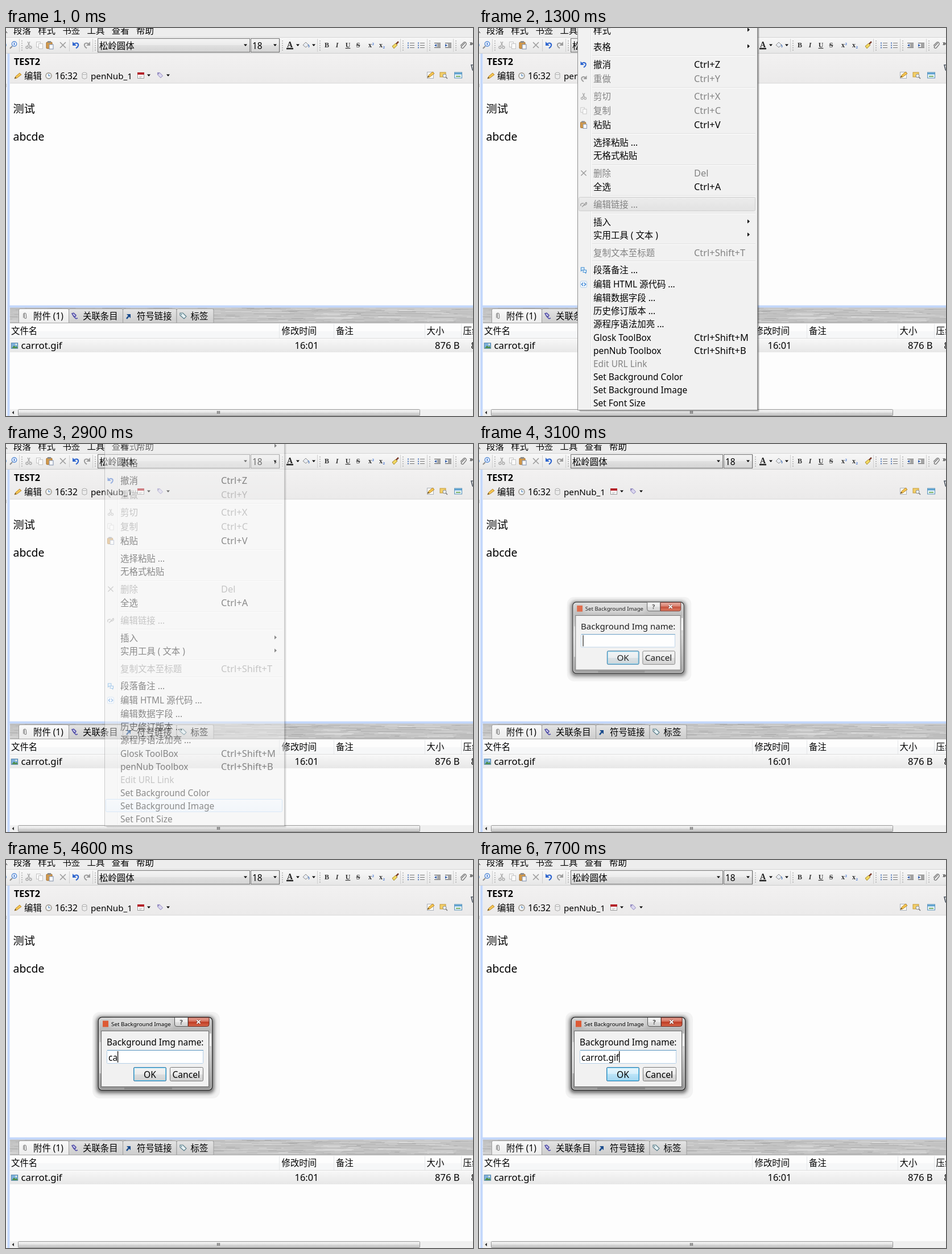
An HTML page for the animation above (8 s loop, 821 px wide and 682 px high).

```html
<!DOCTYPE html>
<html lang="zh-CN">
<head>
<meta charset="utf-8">
<title>Set Background Image</title>
<style>
html, body { margin: 0; width: 100%; height: 100%; overflow: hidden; background: #fdfdfd; }
svg { display: block; width: 821px; height: 682px; }
text { font-family: "Noto Sans", "Noto Sans CJK SC", sans-serif; white-space: pre; }
.serif { font-family: "Liberation Serif", serif; }
</style>
</head>
<body>
<svg id="stage" viewBox="0 0 821 682" xmlns="http://www.w3.org/2000/svg"></svg>
<script>
const LOOP = 8000;
const stage = document.getElementById('stage');

// drawing helpers
const attrs = (o = {}) => Object.entries(o).map(([k, v]) => ` ${k}="${v}"`).join('');
const text = (x, y, s, size = 15.4, fill = '#000', o) =>
  `<text x="${x}" y="${y}" font-size="${size}" fill="${fill}"${attrs(o)}>${s}</text>`;
const rect = (x, y, w, h, fill, o) =>
  `<rect x="${x}" y="${y}" width="${w}" height="${h}" fill="${fill}"${attrs(o)}/>`;
const path = (d, stroke, w = 1, fill = 'none', o) =>
  `<path d="${d}" stroke="${stroke}" stroke-width="${w}" fill="${fill}"${attrs(o)}/>`;
const circle = (x, y, r, fill, o) => `<circle cx="${x}" cy="${y}" r="${r}" fill="${fill}"${attrs(o)}/>`;
const at = (x, y, s) => `<g transform="translate(${x} ${y})">${s}</g>`;
const grad = (id, ...stops) => `<linearGradient id="${id}" x2="0" y2="1">` +
  stops.map(([p, c]) => `<stop offset="${p}" stop-color="${c}"/>`).join('') + '</linearGradient>';
const down = (x, y) => path(`M${x - 3} ${y - 1.5}h6l-3 3.5z`, 'none', 0, '#000');
const right = (x, y) => path(`M${x - 2} ${y - 3.5}v7l4 -3.5z`, 'none', 0, '#000');

const defs = '<defs>' +
  grad('bar', [0, '#f8f8f8'], [0.45, '#f1f1f1'], [1, '#e6e6e6']) +
  grad('head', [0, '#f2f1f1'], [1, '#ebeaea']) +
  grad('combo', [0, '#f4f4f4'], [0.5, '#ebebeb'], [0.5, '#e0e0e0'], [1, '#d3d3d3']) +
  grad('tab', [0, '#e4e4e4'], [1, '#cdcdcd']) +
  grad('tabOn', [0, '#fafafa'], [1, '#ececec']) +
  grad('row', [0, '#f7f7f7'], [1, '#e7e7e7']) +
  grad('thumb', [0, '#f4f4f4'], [0.5, '#e6e6e6'], [0.5, '#d6d6d6'], [1, '#c4c4c4']) +
  grad('btn', [0, '#f3f3f3'], [0.5, '#ebebeb'], [0.5, '#dedede'], [1, '#d0d0d0']) +
  grad('btnHot', [0, '#e8f6fd'], [0.5, '#d5eefb'], [0.5, '#bce4f8'], [1, '#a4d6f0']) +
  grad('frame', [0, '#d5d5d5'], [0.18, '#b5b5b5'], [0.45, '#d0d0d0'], [1, '#929292']) +
  grad('red', [0, '#e8a698'], [0.45, '#d5705d'], [0.5, '#be3a22'], [1, '#d9694d']) +
  grad('hot', [0, '#f1f6fb'], [1, '#e5eef8']) +
  grad('dead', [0, '#ececec'], [1, '#e2e2e2']) +
  '<filter id="soft" x="-20%" y="-20%" width="140%" height="140%"><feGaussianBlur stdDeviation="3"/></filter>' +
  '</defs>';

// icons, centred on 0,0
const GREY = '#a9a9a9';
const icon = {
  cut: path('M-2 -6L2 2M2 -6L-2 2', GREY, 1.4) +
    circle(-3, 4, 2, 'none', { stroke: GREY, 'stroke-width': 1.4 }) + circle(3, 4, 2, 'none', { stroke: GREY, 'stroke-width': 1.4 }),
  copy: rect(-5.5, -5.5, 7, 9, '#fafafa', { stroke: '#c4c4c4' }) + rect(-1.5, -2.5, 7, 9, '#fafafa', { stroke: '#c4c4c4' }),
  paste: rect(-6, -5, 10, 11, '#d39a4b', { rx: 1, stroke: '#a06a28' }) + rect(-4, -7, 6, 3, '#8c8c8c') +
    rect(-1, -1, 7, 8, '#f6f8fb', { stroke: '#7d8ca8' }),
  del: path('M-5 -5L5 5M5 -5L-5 5', '#9a9a9a', 1.5),
  undo: path('M-4 -1C-1 -5 5 -4 4 1C3.5 3 2 4.5 0 5.5', '#2f66cf', 2.2) + path('M-6 -6v7h7z', 'none', 0, '#2f66cf'),
  redo: path('M4 -1C1 -5 -5 -4 -4 1C-3.5 3 -2 4.5 0 5.5', '#9b9b9b', 2) + path('M6 -6v7h-7z', 'none', 0, '#9b9b9b'),
  link: path('M-5 3a3 3 0 0 1 2 -5l3 0M5 -4a3 3 0 0 1 -2 5l-3 1M-3 5L5 -4', '#9f9f9f', 1.6),
  note: path('M-5 -5h6v5h-4l-2 2z', '#3d8ad0', 1.1, '#d8ecfb') + path('M-1 0h6v4h-1v2l-2 -2h-3z', '#3d8ad0', 1.1, '#eef7fd'),
  code: rect(-6, -6, 12, 12, '#f3f8fd', { rx: 2, stroke: '#a9c9e8' }) + path('M-1 -3l-3 3l3 3M1 -3l3 3l-3 3', '#2c7ad0', 1.4),
  pencil: path('M-6 5L-4 1L3 -5L6 -2L-2 4z', '#b9862d', 1, '#f4c552') + path('M-6 5l1.5 -3l1.5 1.5z', 'none', 0, '#4a4030'),
  clock: circle(0, 0, 5, '#f4f8fb', { stroke: '#a8a39a', 'stroke-width': 1.8 }) + path('M0 -3V0H3', '#4a7fb5', 1.2),
  disk: path('M-4 -4v8q4 3 8 0v-8', '#a8a8a8', 1, '#ededed') +
    '<ellipse cy="-4" rx="4" ry="1.8" fill="#f8f8f8" stroke="#a8a8a8"/>',
  cal: rect(-5.5, -4.5, 11, 10, '#fff', { stroke: '#9a9a9a' }) + rect(-6, -5, 12, 4, '#b4232a') + path('M-3 2h6M-3 4h4', '#bbb'),
  tag: path('M-5 -5h4l6 6l-4 4l-6 -6z', '#7d74b5', 1, '#dcd8f0') + circle(-3, -3, 1, '#5a5190'),
  clip: path('M3 -4L-3 2a2 2 0 0 0 3 3L5 -1a3 3 0 0 0 -4 -4L-5 1', '#777', 1.3),
  chain: path('M-5 -4l3 -1l4 4l-1 2l-3 0zM5 4l-3 1l-4 -4', '#4a47a3', 1.5, '#cfcdee'),
  pic: rect(-6, -4.5, 12, 10, '#7fb2dd', { stroke: '#4c7fa8' }) + path('M-5 5L-1 0L2 3L4 1L6 5z', 'none', 0, '#4d8e46') + circle(3, -2, 1.5, '#f6f6d8')
};
const put = (name, x, y, k = 1) => `<g transform="translate(${x} ${y}) scale(${k})">${icon[name]}</g>`;

// top bars
const grip = x => path(`M${x} 22V40`, '#9c9c9c', 1.5, 'none', { 'stroke-dasharray': '1.5 2.5' }) +
  path(`M${x - 4.5} 19V42`, '#d0d0d0');
const lines = (x, c) => [-4, 0, 4].map(d => path(`M${x - 2} ${30.5 + d}h8`, '#777') + rect(x - 6, 29.5 + d, 2, 2, c)).join('');
const indent = (x, dir) => path(`M${x - 5} 26.5h11M${x} 28.5h6M${x} 30.5h6M${x} 32.5h6M${x - 5} 34.5h11`, '#555') +
  path(`M${x - 3 + dir * 2} 30.5l${-dir * 4} -2.5v5z`, 'none', 0, '#3762ad');
const glyph = (x, s, o) => text(x, 34, s, 12, '#333', { class: 'serif', 'text-anchor': 'middle', 'font-weight': 700, ...o });

function topBars() {
  let s = rect(0, 0, 821, 17, '#ededed') + rect(0, 16, 821, 28, 'url(#bar)') + path('M0 16.5H821', '#d5d5d5') + path('M0 44.5H821', '#cfcfcf');
  ['段落', '样式', '书签', '工具', '查看', '帮助'].forEach((w, i) => s += text(13 + i * 43.2, 10, w));
  s += path('M0 6l2 3', '#333') + circle(-2, 30, 3, '#6b9bd8') + at(13, 30,
    path('M-2 2L-6 6', '#8b8b8b', 2) + circle(1.5, -2, 4.2, '#eef5fd', { stroke: '#5c8fd6', 'stroke-width': 1.4 }) + path('M1.5 -4v4', '#2f66cf', 1.5));
  s += [28, 157, 486, 552, 698, 745, 791].map(grip).join('') + path('M111.5 20V41', '#cfcfcf');
  s += put('cut', 40, 30) + put('copy', 59, 30) + put('paste', 77, 30) + put('del', 100, 30) + put('undo', 123, 30) + put('redo', 142, 30);
  s += rect(161.5, 18.5, 267, 24, 'url(#combo)', { stroke: '#707070' }) + text(164, 36.5, '松岭圆体') + down(421, 30);
  s += rect(430.5, 18.5, 50, 24, 'url(#combo)', { stroke: '#707070' }) + text(433, 36.5, '18') + down(473, 30);
  s += text(499, 34, 'A', 14, '#222', { class: 'serif', 'text-anchor': 'middle', 'font-weight': 700 }) + rect(493, 35, 12, 2.5, '#222') + down(513, 30);
  s += at(527, 30, path('M-5 0L0 -5L5 0L0 4z', '#8a8a8a', 1, '#e9edf3') + path('M4 -1q3 3 1 5', '#5a82c0', 1.5)) + down(541, 30);
  s += glyph(564, 'B') + glyph(582, 'I', { 'font-style': 'italic' }) + glyph(601, 'U', { 'text-decoration': 'underline' }) +
    glyph(619, 'S', { 'text-decoration': 'line-through' });
  const small = (x, y) => text(x, y, '2', 7, '#2f66cf', { class: 'serif', 'font-weight': 700 });
  s += glyph(640, 'x') + small(643.5, 30) + glyph(659, 'x') + small(662.5, 36);
  s += at(684, 30, path('M-5 2L1 -3L4 0L-2 6z', '#a78a2c', 1, '#f1d763') + path('M2 -2L6 -6', '#7b3c2c', 2.5));
  s += lines(712, '#4f79bd') + lines(730, '#4f79bd') + indent(758, -1) + indent(777, 1) + put('clip', 804, 30) + text(815, 31, '»', 12);
  return s;
}

function titleBar() {
  return rect(7, 45, 814, 52, 'url(#head)') + path('M7 97H821', '#d7d7d7') +
    text(14, 64.5, 'TEST2', 16.2, '#000', { 'font-weight': 700 }) +
    put('pencil', 21, 84) + text(32, 89.5, '编辑') + put('clock', 75, 84) + text(86, 89.5, '16:32', 15.6) +
    put('disk', 138, 84) + text(149, 89.5, 'penNub_1', 15.2) + put('cal', 237, 83) + down(251, 83) + put('tag', 271, 83, 0.9) + down(285, 83) +
    at(746, 83, rect(-5.5, -5.5, 11, 11, '#fbfbf4', { stroke: '#a9b0bb' }) + at(1, -1, icon.pencil)) +
    at(769, 83, rect(-6, -5, 10, 8, '#f3cf69', { stroke: '#c49a36' }) + circle(2, 1, 3, '#eaf3fb', { stroke: '#888' }) + path('M4 3l3 3', '#777', 1.6)) +
    at(795, 83, rect(-6.5, -5, 13, 10, '#e8f3fa', { stroke: '#5b92b8' }) + rect(-6, -4.5, 12, 3, '#5aa0d0') + rect(-4, 1, 8, 2, '#7fb36a')) +
    path('M821 65l-3 0l2 8l1 2', '#48525e', 1.6);
}

// lower panel
function metal() {
  let seed = 7, s = rect(7, 491, 814, 27, '#c3c3c3');
  const rnd = () => (seed = seed * 16807 % 2147483647) / 2147483647;
  for (let i = 0; i < 420; i++) {
    const v = 150 + Math.round(rnd() * 90);
    s += rect((rnd() * 830 - 10).toFixed(1), 492 + Math.floor(rnd() * 25), (15 + rnd() * 60).toFixed(1), 1, `rgb(${v},${v},${v})`, { opacity: 0.5 });
  }
  return s;
}
const tab = (x, w, label, on) =>
  path(`M${x + 0.5} 518V496q0 -2.5 2.5 -2.5h${w - 5}q2.5 0 2.5 2.5V518`, '#9d9d9d', 1, `url(#${on ? 'tabOn' : 'tab'})`) + text(x + (on ? 26 : 25), 512, label);

function panel() {
  let s = metal() + rect(0, 487.5, 821, 4, '#c3d7fb') + path('M7 518.5H821', '#a9a9a9');
  s += tab(110, 95, '关联条目') + tab(205, 94.5, '符号链接') + tab(299.5, 65, '标签') + tab(22, 88, '附件 (1)', true);
  s += `<g transform="translate(33 506) rotate(-45) scale(.8)">${icon.clip}</g>` + put('chain', 121, 506) +
    at(215, 506, path('M-3 5L1 0', '#174a8c', 2.5) + path('M-3 -3h7v7z', 'none', 0, '#174a8c')) +
    at(311, 506, path('M-5 -5h5l6 6l-4 4l-7 -6z', '#4f7480', 1.1, '#e6f2f5') + circle(-2.5, -2.5, 1, '#4f7480'));
  s += rect(7, 519, 814, 26, '#fdfdfd') + rect(7, 533, 814, 12, '#f6f7f8') + path('M7 545.5H821', '#dcdcdc');
  s += [480, 576, 736, 800].map(x => path(`M${x + 0.5} 520V545`, '#e4e6e8')).join('');
  s += text(9, 538, '文件名') + text(484.5, 538, '修改时间') + text(580, 538, '备注') + text(739.5, 538, '大小') + text(803.5, 538, '压缩');
  s += rect(7, 547, 814, 23, 'url(#row)') + put('pic', 15, 558, 0.95) + text(26.5, 564, 'carrot.gif', 16.8) +
    text(507.5, 564, '16:01', 16.4) + text(754, 564, '876 B', 16.6) + text(817.5, 564, '8', 16.6);
  s += rect(7, 670, 814, 12, '#f0f0f0') + path('M14 673v6l-3.5 -3z', 'none', 0, '#333') +
    rect(21.5, 670.5, 706, 11, 'url(#thumb)', { stroke: '#969696', rx: 1 }) + path('M371.5 673v5M373.5 673v5M375.5 673v5', '#555');
  return s + rect(0, 45, 3, 637, '#f3f5f9') + rect(2.5, 45, 4, 637, '#c3d7fb') + path('M0 98v6', '#999');
}

// context menu: centre y, label, shortcut, disabled, icon
const items = [
  [4, '样式'], [33, '表格'], [64, '撤消', 'Ctrl+Z', 0, 'undo'], [89, '重做', 'Ctrl+Y', 1, 'redo'],
  [120, '剪切', 'Ctrl+X', 1, 'cut'], [145, '复制', 'Ctrl+C', 1, 'copy'], [170, '粘贴', 'Ctrl+V', 0, 'paste'],
  [201, '选择粘贴 ...'], [224, '无格式粘贴'], [255, '删除', 'Del', 1, 'del'], [279, '全选', 'Ctrl+A'],
  [310, '编辑链接 ...', '', 1, 'link'], [341, '插入'], [364, '实用工具 ( 文本 )'], [395, '复制文本至标题', 'Ctrl+Shift+T', 1],
  [425.5, '段落备注 ...', '', 0, 'note'], [450.5, '编辑 HTML 源代码 ...', '', 0, 'code'], [474, '编辑数据字段 ...'],
  [497, '历史修订版本 ...'], [520, '源程序语法加亮 ...'], [544, 'Glosk ToolBox', 'Ctrl+Shift+M'], [567, 'penNub Toolbox', 'Ctrl+Shift+B'],
  [590, 'Edit URL Link', '', 1], [613, 'Set Background Color'], [636, 'Set Background Image'], [659, 'Set Font Size']
];

function menu() {
  let s = rect(177, -10, 316, 685, '#000', { opacity: 0.12, rx: 2 }) + rect(176, -10, 315.5, 683, '#000', { opacity: 0.28, rx: 1 }) +
    rect(173.5, -10.5, 316, 682, '#f1f1f1', { stroke: '#8f8f8f' }) +
    path('M196.5 0V669', '#e1e2e2') + path('M197.5 0V669', '#fff');
  s += [48, 104, 185, 240, 294, 325, 379, 409].map(y => path(`M199 ${y + 0.5}H486`, '#dfdfdf') + path(`M199 ${y + 1.5}H486`, '#fff')).join('');
  s += rect(175.5, 0, 310, 22, 'none', { id: 'hover', rx: 2 });
  for (const [y, label, key, off, ic] of items) {
    const fill = off ? '#838383' : '#000';
    s += text(201, y + 5.6, label, 15.45, fill);
    if (key) s += text(378, y + 5.6, key, 16.4, fill);
    if (ic) s += put(ic, 184, y, 0.92);
  }
  return s + [3, 32, 340, 363].map(y => right(474, y)).join('');
}

function dialog() {
  const button = (x, w, label, tx, id) => rect(x + 0.5, 364.5, w, 24, 'url(#btn)', { rx: 2, stroke: '#777' }) +
    (id ? `<g id="${id}">` + rect(x + 1, 365, w - 1, 23, 'url(#btnHot)', { rx: 2 }) + '</g>' +
      rect(x + 0.5, 364.5, w, 24, 'none', { rx: 2, stroke: '#3c7fb1' }) +
      rect(x + 1.5, 365.5, w - 2, 22, 'none', { rx: 1, stroke: '#48c4ee', opacity: 0.75 }) : '') + text(tx, 382.5, label, 15.6);
  return rect(152, 267, 224, 152, '#f2f2f2', { rx: 13 }) + rect(159, 275, 207, 135, '#000', { rx: 8, opacity: 0.55, filter: 'url(#soft)' }) +
    rect(162.5, 276.5, 200, 128, 'url(#frame)', { rx: 6, stroke: '#2f2f2f', 'stroke-width': 1.4 }) +
    rect(163.8, 277.8, 197.4, 125.4, 'none', { rx: 5, stroke: '#efefef', opacity: 0.75 }) +
    rect(164.5, 320, 3, 55, '#f5f5f5', { opacity: 0.6 }) + rect(358, 305, 3, 22, '#fff', { opacity: 0.8 }) + rect(208, 400, 84, 3, '#6f6f6f', { opacity: 0.5 }) +
    rect(182, 280, 111, 16, '#fff', { rx: 7, opacity: 0.3, filter: 'url(#soft)' }) +
    rect(170, 282.5, 10, 11, '#dd5a35') + text(185, 292, 'Set Background Image', 9.8) +
    path('M296.5 277v12q0 3.5 3.5 3.5h20V277', '#555', 1, 'url(#btn)') + path('M320.5 277v15.5h33q3.5 0 3.5 -3.5V277z', '#6d241a', 1, 'url(#red)') +
    text(308, 289, '?', 11, '#444', { 'text-anchor': 'middle', 'font-weight': 700 }) +
    path('M335.5 281.5l6 6M341.5 281.5l-6 6', '#6b3028', 3.4) + path('M335.5 281.5l6 6M341.5 281.5l-6 6', '#fff', 2) +
    rect(167.5, 300.5, 189, 98, '#f1f1f1', { stroke: '#6a6a6a' }) +
    text(177, 325.5, 'Background Img name:', 15.45) +
    rect(177.5, 334.5, 169, 23, '#fff', { rx: 1, stroke: '#b5cfe7' }) + path('M178 334.5H347', '#5794bf') +
    text(180, 352.5, '', 15.4, '#000', { id: 'field' }) + rect(181, 336, 1.2, 20, '#000', { id: 'caret' }) +
    button(224, 57, 'OK', 242, 'pulse') + button(288, 58, 'Cancel', 292.5);
}

stage.innerHTML = defs + rect(0, 0, 821, 682, '#fdfdfd') + topBars() + titleBar() +
  text(12.5, 149, '测试', 19.2) + text(12.5, 197.5, 'abcde', 19.4) + rect(51.5, 131, 1.2, 23, '#000', { id: 'mark' }) +
  panel() + `<g id="menu">${menu()}</g><g id="dialog">${dialog()}</g>`;

const el = {};
for (const id of ['mark', 'menu', 'hover', 'dialog', 'field', 'caret', 'pulse']) el[id] = document.getElementById(id);
const show = (node, a) => node.setAttribute('opacity', a);
const last = (list, t) => list.reduce((v, [from, x]) => t >= from ? x : v, null);

const WORD = 'carrot.gif';
const keys = [4200, 4400, 4900, 5300, 5700, 6000, 6800, 7100, 7500, 7700];
const glow = [3000, 3700, 4100, 4600, 5100, 5600, 5900, 6300, 6500, 7100, 7300, 7700];
const menuFade = [[0, 0], [800, 0.4], [900, 0.8], [1000, 1], [2900, 0.45], [3000, 0]];
const dialogIn = [[0, 0], [3000, 0.45], [3100, 0.88], [3200, 1]];
const hoverAt = [[1100, 6], [1200, 9], [1300, 11], [1400, 13], [1500, 14], [1700, 16], [1800, 18], [1900, 20], [2000, 23], [2300, 24]];
const within = (t, a, b) => t >= a && t < b;

function draw(t) {
  show(el.mark, within(t, 700, 1200) ? 1 : 0);
  show(el.menu, last(menuFade, t));

  const n = last(hoverAt, t);
  show(el.hover, n === null ? 0 : 1);
  if (n !== null) {
    const [y, , , off, ic] = items[n], h = off || ic ? 25 : 23;
    el.hover.setAttribute('y', Math.floor(y - h / 2) + 0.5);
    el.hover.setAttribute('height', h - 1);
    el.hover.setAttribute('fill', off ? 'url(#dead)' : 'url(#hot)');
    el.hover.setAttribute('stroke', off ? '#cfcfcf' : '#afd0f0');
  }

  const a = last(dialogIn, t), k = 0.8 + 0.2 * a;
  show(el.dialog, a);
  el.dialog.setAttribute('transform', `translate(262.5 341) scale(${k}) translate(-262.5 -341)`);
  const typed = WORD.slice(0, keys.filter(x => t >= x).length);
  if (el.field.textContent !== typed) el.field.textContent = typed;
  el.caret.setAttribute('x', typed ? 180 + el.field.getComputedTextLength() : 180.5);
  show(el.caret, within(t, 3400, 3900) || within(t, 6600, 6800) ? 0 : 1);
  const g = glow.filter(x => t >= x).pop() || 0;
  show(el.pulse, 0.5 + 0.5 * Math.cos((g - 7700) / 1000 * Math.PI));
}

const start = performance.now();
function tick() {
  draw((performance.now() - start) % LOOP);
  requestAnimationFrame(tick);
}
tick();
</script>
</body>
</html>
```
